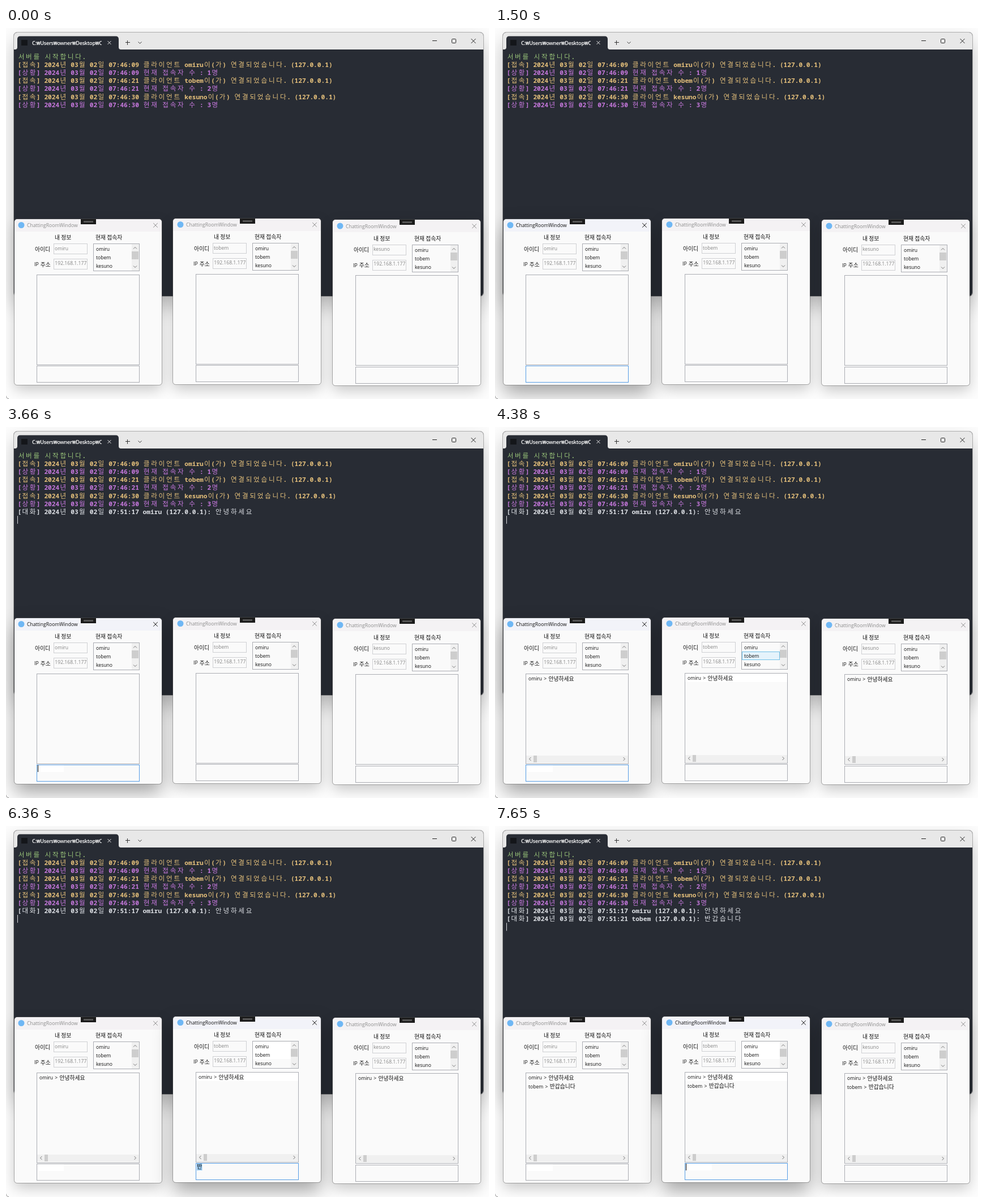
Recreate the animation shown at these times as an HTML page with a canvas. Size 853 by 656 pixels, loop 8 s.

```html
<!DOCTYPE html>
<html lang="ko">
<head>
<meta charset="utf-8">
<title>Chatting room</title>
<style>
html, body { margin: 0; width: 100%; height: 100%; overflow: hidden; background: #fdfdfd; }
canvas { display: block; }
</style>
</head>
<body>
<canvas id="stage" width="853" height="656"></canvas>
<script>
const ctx = document.getElementById('stage').getContext('2d');
const LOOP = 8000;
const USERS = ['omiru', 'tobem', 'kesuno'];
const HANGUL = '"Noto Sans CJK KR", "Noto Sans CJK", sans-serif';
const LATIN = '"Open Sans", "Noto Sans", sans-serif';
const MONO = '"Noto Sans Mono", "DejaVu Sans Mono", monospace';
const isHangul = ch => /[ㄱ-ㅎ가-힣]/.test(ch);

const GREEN = '#98c379', YELLOW = '#e5c07b', PURPLE = '#c678dd', WHITE = '#dcdfe4';
const DARK = '#282c34', EDGE = 'rgba(90,90,90,.45)';
const DAY = '2024년 03월 02일 ';

// Terminal output: [time it appears, colour, text]
const log = [[0, GREEN, '서버를 시작합니다.']];
['07:46:09', '07:46:21', '07:46:30'].forEach((clock, i) => {
  log.push([0, YELLOW, `[접속] ${DAY}${clock} 클라이언트 ${USERS[i]}이(가) 연결되었습니다. (127.0.0.1)`]);
  log.push([0, PURPLE, `[상황] ${DAY}${clock} 현재 접속자 수 : ${i + 1}명`]);
});
log.push([3660, WHITE, `[대화] ${DAY}07:51:17 ${USERS[0]} (127.0.0.1): 안녕하세요`]);
log.push([7620, WHITE, `[대화] ${DAY}07:51:21 ${USERS[1]} (127.0.0.1): 반갑습니다`]);

const chat = [
  [3690, `${USERS[0]} > 안녕하세요`],
  [7650, `${USERS[1]} > 반갑습니다`]
];

// Timelines: [start, value]
const typing = [
  [[0, ''], [1800, 'ㅇ'], [1890, '아'], [2010, '안'], [2160, '안ㄴ'], [2370, '안녀'],
   [2700, '안녕'], [2910, '안녕ㅎ'], [2970, '안녕하'], [3060, '안녕핫'], [3150, '안녕하세'],
   [3240, '안녕하셍'], [3330, '안녕하세요'], [3660, '']],
  [[0, ''], [5850, 'ㅂ'], [6150, '바'], [6330, '반'], [6480, '반ㄱ'], [6720, '반가'],
   [6810, '반갑'], [6900, '반값'], [6930, '반갑스'], [7200, '반갑습'], [7230, '반갑습ㄴ'],
   [7350, '반갑습니'], [7410, '반갑습니다'], [7620, '']],
  [[0, '']]
];
const caret = [
  [[0, false], [900, true], [1500, false], [3660, true], [4170, false], [4620, true], [5130, false]],
  [[0, false], [5460, true], [5850, false], [7620, true]],
  [[0, false]]
];
const border = [
  [[0, ''], [420, 'hover'], [900, 'focus'], [5460, '']],
  [[0, ''], [5280, 'hover'], [5460, 'focus']],
  [[0, '']]
];
const active = [[[0, false], [870, true], [5460, false]], [[0, false], [5460, true]], [[0, false]]];
const userHover = [[0, -1], [4380, 1], [4530, 0], [4710, 1], [4800, -1]];
const chatHover = [[0, false], [4320, true], [4350, false], [4890, true], [5100, false]];
const at = (track, t) => track.reduce((v, [start, value]) => t >= start ? value : v, track[0][1]);

function fill(x, y, w, h, color) {
  ctx.fillStyle = color;
  ctx.fillRect(x, y, w, h);
}

function frame(x, y, w, h, color) {
  ctx.strokeStyle = color;
  ctx.lineWidth = 1;
  ctx.strokeRect(Math.round(x) + .5, Math.round(y) + .5, w, h);
}

function path(points, color, width = 1) {
  ctx.beginPath();
  points.forEach(([x, y], i) => i ? ctx.lineTo(x, y) : ctx.moveTo(x, y));
  ctx.strokeStyle = color;
  ctx.lineWidth = width;
  ctx.stroke();
}

function cross(x, y, r, color) {
  path([[x - r, y - r], [x + r, y + r]], color);
  path([[x - r, y + r], [x + r, y - r]], color);
}

// Chevron pointing along (dx, dy)
function chevron(x, y, dx, dy, color, r = 3) {
  const h = r / 2;
  path([[x - dx * h - dy * r, y - dy * h - dx * r], [x + dx * h, y + dy * h],
        [x - dx * h + dy * r, y - dy * h + dx * r]], color);
}

function panel(x, y, w, h, r, color, alpha, blur, drop) {
  ctx.save();
  ctx.shadowColor = `rgba(0,0,0,${alpha})`;
  ctx.shadowBlur = blur;
  ctx.shadowOffsetY = drop;
  ctx.fillStyle = color;
  ctx.beginPath();
  ctx.roundRect(x, y, w, h, r);
  ctx.fill();
  ctx.restore();
}

function outline(x, y, w, h, r) {
  ctx.strokeStyle = EDGE;
  ctx.lineWidth = 1;
  ctx.beginPath();
  ctx.roundRect(x - .5, y - .5, w + 1, h + 1, r);
  ctx.stroke();
}

// Interface text, with Hangul set slightly larger than Latin
function label(text, x, y, color = '#111') {
  ctx.save();
  ctx.fillStyle = color;
  ctx.wordSpacing = '1px';
  for (const run of text.match(/[ㄱ-ㅎ가-힣]+|[^ㄱ-ㅎ가-힣]+/g) || []) {
    const korean = isHangul(run[0]);
    ctx.font = korean ? `9.8px ${HANGUL}` : `8.6px ${LATIN}`;
    ctx.fillText(run, x, y + (korean ? 3.7 : 3.3));
    x += ctx.measureText(run).width;
  }
  ctx.restore();
}

// Terminal text sits on a fixed grid; Hangul takes two cells
function gridText(text, row, color) {
  const cell = 6.7;
  let x = 20.5;
  ctx.fillStyle = color;
  for (const ch of text) {
    const wide = isHangul(ch);
    ctx.font = wide ? `11.6px ${HANGUL}` : `600 11.2px ${MONO}`;
    ctx.fillText(ch, x + (wide ? 1.2 : 0), 54.6 + row * 14.2);
    x += wide ? cell * 2 : cell;
  }
}

function terminal(t) {
  panel(14, 8, 829, 466, 6, DARK, .24, 36, 16);
  ctx.save();
  ctx.beginPath();
  ctx.roundRect(14, 8, 829, 466, 6);
  ctx.clip();
  fill(14, 8, 829, 30, '#e8e8e8');
  ctx.restore();

  ctx.fillStyle = DARK;
  ctx.beginPath();
  ctx.moveTo(16, 38);
  ctx.quadraticCurveTo(20, 38, 20, 34);
  ctx.lineTo(20, 20);
  ctx.quadraticCurveTo(20, 14.5, 25, 14.5);
  ctx.lineTo(194, 14.5);
  ctx.quadraticCurveTo(199, 14.5, 199, 20);
  ctx.lineTo(199, 34);
  ctx.quadraticCurveTo(199, 38, 203, 38);
  ctx.fill();
  fill(27, 21, 11, 10, '#14161a');

  ctx.save();
  ctx.beginPath();
  ctx.rect(44, 16, 125, 20);
  ctx.clip();
  ctx.font = `600 9.2px ${LATIN}`;
  ctx.letterSpacing = '-0.3px';
  ctx.fillStyle = '#fff';
  ctx.fillText('C:₩Users₩owner₩Desktop₩C', 46, 29.5);
  ctx.restore();

  cross(182.5, 26, 3, '#e8e8e8');
  path([[211, 25.5], [219, 25.5]], '#333');
  path([[214.5, 22], [214.5, 30]], '#333');
  chevron(236.5, 26, 0, 1, '#333');
  path([[753, 22.5], [761, 22.5]], '#222');
  ctx.strokeStyle = '#222';
  ctx.beginPath();
  ctx.roundRect(787.5, 19.5, 7, 7, 1);
  ctx.stroke();
  cross(825.5, 23, 4, '#222');
  outline(14, 8, 829, 466, 6);

  const shown = log.filter(line => t >= line[0]);
  shown.forEach(([, color, text], row) => gridText(text, row, color));
  if (t >= 3660) fill(20, 43.5 + shown.length * 14.2, 1, 14, '#d8dade');
}

function userList(i, x, y, t) {
  const hover = i === 1 ? at(userHover, t) : -1;
  fill(x, y, 82, 49, '#fafafa');
  if (i === 1 && t >= 4530) fill(x + 1, y + 2, 67, 30, '#fff');
  if (hover >= 0) {
    fill(x + 1, y + 2 + hover * 15, 67, 15, '#e5f3fb');
    frame(x + 1, y + 2 + hover * 15, 66, 14, '#70c0e7');
  }
  USERS.forEach((name, k) => label(name, x + 5, y + 10 + k * 15));
  fill(x + 68, y + 1, 13, 47, '#f0f0f0');
  fill(x + 68, y + 14, 12, 14, '#cdcdcd');
  chevron(x + 74, y + 8, 0, -1, '#777');
  chevron(x + 74, y + 41, 0, 1, '#777');
  frame(x, y, 81, 48, '#abadb3');
}

function chatBox(i, x, y, t) {
  const lines = chat.filter(line => t >= line[0]);
  if (i === 1 && t >= 4320) fill(x + 1, y + 1, 180, 15, '#fff');
  if (i === 1 && at(chatHover, t)) {
    fill(x + 1, y + 1, 180, 15, '#e5f3fb');
    frame(x + 1, y + 1, 179, 14, '#70c0e7');
  }
  lines.forEach(([, text], k) => label(text, x + 5, y + 9 + k * 15.3));
  if (lines.length) {
    fill(x + 1, y + 145, 180, 13, '#f0f0f0');
    fill(x + 14, y + 145, 6, 12, '#cdcdcd');
    chevron(x + 8, y + 151, -1, 0, '#777');
    chevron(x + 174, y + 151, 1, 0, '#777');
  }
  frame(x, y, 181, 159, '#abadb3');
}

function inputBox(i, x, y, t) {
  const text = at(typing[i], t), step = 9;
  const reach = Math.max(...typing[i].filter(k => t >= k[0]).map(k => k[1].length));
  fill(x + 3, y + 1, reach * step, 12, '#fff');
  if (text) {
    fill(x + 2 + (text.length - 1) * step, y + 1, step + .5, 12, '#99c9ef');
    label(text, x + 2.3, y + 6.6);
  }
  if (at(caret[i], t)) fill(x + 2, y + 1, 1, 12, '#000');
  const colors = { '': '#abadb3', hover: '#7eb4ea', focus: '#569de5' };
  frame(x, y, 181, 29, colors[at(border[i], t)]);
}

function chatWindow(i, t) {
  const x = [15, 296, 578][i], y = [338, 337, 339.5][i];
  const on = at(active[i], t);
  const ink = on ? '#111' : '#8c8c8c';
  const top = Math.floor(y), left = x - (i ? 1 : 0), width = i ? 261 : 260;

  panel(left, top, width, 293, 5, '#fafafa', on ? .36 : .21, on ? 34 : 24, on ? 15 : 9);
  ctx.fillStyle = on ? '#f2f3f9' : '#f4f2f4';
  ctx.beginPath();
  ctx.roundRect(left, top, width, 22, [5, 5, 0, 0]);
  ctx.fill();
  outline(left, top, width, 293, 5);

  ctx.fillStyle = '#6fb7f4';
  ctx.beginPath();
  ctx.arc(x + 12, y + 10.5, 5.5, 0, Math.PI * 2);
  ctx.fill();
  label('ChattingRoomWindow', x + 22, y + 11, ink);
  fill(x + 117, top, 27, 9, '#1b1b1b');
  fill(x + 122, top + 3, 17, 3, '#555');
  cross(x + 249, y + 10.8, 3.8, ink);

  label('내 정보', x + 71, y + 32.5);
  label('현재 접속자', x + 143, y + 32.5);
  label('아이디', x + 36, y + 53);
  label('IP 주소', x + 35, y + 80);
  frame(x + 69, y + 43, 59, 18, '#cfd0d3');
  frame(x + 69, y + 70, 59, 18, '#cfd0d3');
  label(USERS[i], x + 71, y + 51.5, '#858585');
  label('192.168.1.177', x + 71.3, y + 77.5, '#858585');

  userList(i, x + 139, Math.round(y + 43), t);
  chatBox(i, x + 39, Math.floor(y + 98), t);
  inputBox(i, x + 39, Math.floor(y + 259.5), t);
}

function draw(t) {
  fill(0, 0, 853, 656, '#fdfdfd');
  terminal(t);
  for (let i = 0; i < 3; i++) chatWindow(i, t);
  ctx.strokeStyle = '#8a8a8a';
  ctx.lineWidth = 1;
  ctx.beginPath();
  ctx.arc(5, 650.5, 5, Math.PI / 2, Math.PI);
  ctx.stroke();
}

const start = performance.now();
function tick() {
  draw((performance.now() - start) % LOOP);
  requestAnimationFrame(tick);
}
tick();
</script>
</body>
</html>
```
